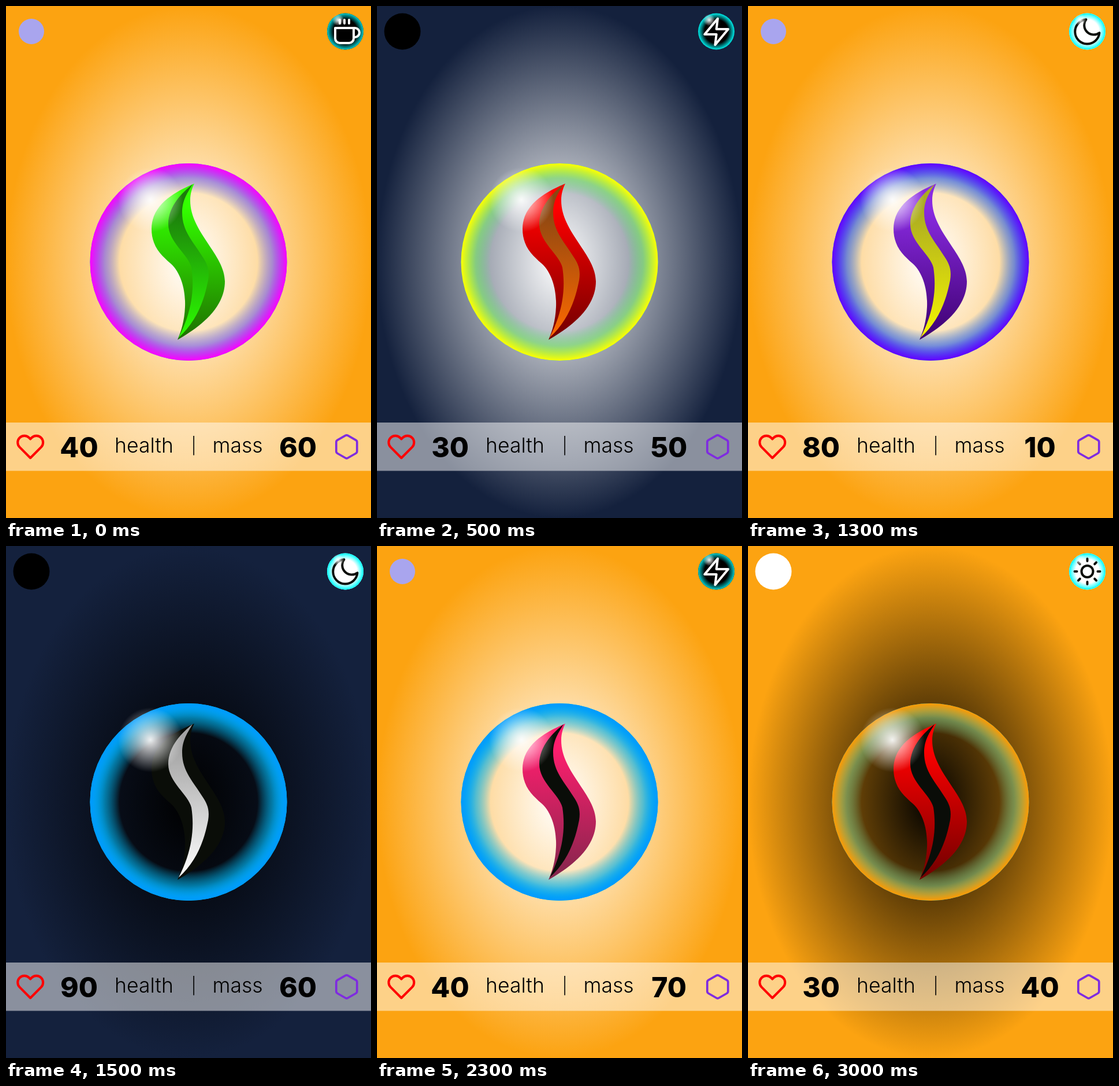
Recreate the animation shown at these times as an HTML page. Size 632x885 px, loop 3.5 s.

```html
<!DOCTYPE html>
<html lang="en">
<head>
<meta charset="utf-8">
<title>Orb cards</title>
<style>
  html, body { margin: 0; width: 100%; height: 100%; overflow: hidden; }
  svg { display: block; width: 632px; height: 885px; }
  text { font-family: Inter, sans-serif; text-anchor: middle; fill: #000; }
  .num { font-size: 48px; font-weight: 800; }
  .label { font-size: 35.5px; font-weight: 300; }
  .line { fill: none; stroke-linecap: round; stroke-linejoin: round; }
  .core { stop-color: var(--core); }
  .edge { stop-color: var(--edge); }
  .rim { stop-color: var(--rim); }
  .badge-rim { stop-color: var(--badgeRim); }
  .leaf-a { stop-color: var(--leafTop); }
  .leaf-b { stop-color: var(--leafEnd); }
  .vein-a { stop-color: var(--veinTop); }
  .vein-b { stop-color: var(--veinEnd); }
</style>
</head>
<body>
<svg id="card" viewBox="0 0 632 885">
  <defs>
    <radialGradient id="bg"><stop class="core"/><stop class="edge" offset="1"/></radialGradient>
    <radialGradient id="teal">
      <stop offset=".7" stop-color="#00c8dc" stop-opacity="0"/>
      <stop offset=".85" stop-color="#00c8dc" stop-opacity=".5"/>
      <stop offset="1" stop-color="#00c8dc"/>
    </radialGradient>
    <radialGradient id="rim">
      <stop class="rim" offset=".7" stop-opacity="0"/>
      <stop class="rim" offset=".85" stop-opacity=".33"/>
      <stop class="rim" offset="1"/>
    </radialGradient>
    <radialGradient id="badgeRim">
      <stop class="badge-rim" offset=".65" stop-opacity="0"/>
      <stop class="badge-rim" offset="1"/>
    </radialGradient>
    <radialGradient id="shine">
      <stop stop-color="#fff" stop-opacity=".93"/>
      <stop offset="1" stop-color="#fff" stop-opacity="0"/>
    </radialGradient>
    <linearGradient id="leaf" x2="0" y2="1">
      <stop class="leaf-a" offset=".15"/><stop class="leaf-b" offset="1"/>
    </linearGradient>
    <linearGradient id="vein" x2="0" y2="1">
      <stop class="vein-a" offset=".15"/><stop class="vein-b" offset="1"/>
    </linearGradient>
  </defs>

  <rect width="632" height="885" fill="url(#bg)"/>

  <circle cx="316" cy="442.5" r="170.5" fill="url(#teal)"/>
  <circle cx="316" cy="442.5" r="170.5" fill="url(#rim)"/>
  <path fill="url(#leaf)" d="M326 307C300 318 252 340 252 385C252 415 268 430 285 445
    C305 463 311 495 310 520C309 545 303 563 297 577C330 558 379 525 379 476
    C379 430 318 390 319 335C319 325 322 315 326 307Z"/>
  <path fill="url(#vein)" d="M323 308C306 322 281 345 281 377C281 408 316 430 321 452
    C327 490 321 530 299 573C330 545 343 510 350 474C353 455 348 445 340 433
    C325 408 305 390 305 357C305 335 315 322 323 308Z"/>
  <circle cx="250" cy="335" r="56" fill="url(#shine)"/>

  <circle id="token" cx="44" cy="44"/>

  <circle id="disc" cx="587.5" cy="44" r="31.5"/>
  <circle cx="587.5" cy="44" r="31.5" fill="url(#badgeRim)"/>
  <path id="icon" class="line"/>
  <circle cx="575.3" cy="24.3" r="10.4" fill="url(#shine)"/>

  <rect y="720" width="632" height="83.5" fill="#fff" fill-opacity=".5"/>
  <path class="line" stroke="#f00" stroke-width="1.95" transform="translate(17 736.6) scale(2.1)"
    d="M20.84 4.61a5.5 5.5 0 0 0-7.78 0L12 5.67l-1.06-1.06a5.5 5.5 0 0 0-7.78 7.78L12 21.23l8.84-8.84a5.5 5.5 0 0 0 0-7.78z"/>
  <text id="health" class="num" x="126.5" y="780"></text>
  <text class="label" x="239" y="772">health</text>
  <text class="label" style="font-size:28px" x="325" y="770">|</text>
  <text class="label" x="401" y="772">mass</text>
  <text id="mass" class="num" x="505.5" y="780"></text>
  <path class="line" stroke="#7f2be0" stroke-width="1.85" transform="translate(565.8 737.8) scale(2)"
    d="M21 16V8a2 2 0 0 0-1-1.73l-7-4a2 2 0 0 0-2 0l-7 4A2 2 0 0 0 3 8v8a2 2 0 0 0 1 1.73l7 4a2 2 0 0 0 2 0l7-4A2 2 0 0 0 21 16z"/>
</svg>
<script>
const STEP = 500;
const ORANGE = '#fca311', NAVY = '#14213d', INK = '#0a0d08';
const $ = id => document.getElementById(id);

// Icons live on a 24 unit grid: centre x, centre y, scale, path.
const icons = {
  coffee: [590, 46, 2, 'M18 8h1a4 4 0 0 1 0 8h-1M2 8h16v9a4 4 0 0 1-4 4H6a4 4 0 0 1-4-4V8zM6 1v3M10 1v3M14 1v3'],
  bolt: [587.7, 44.5, 2.27, 'M13 2L3 14h9l-1 8 10-12h-9z'],
  moon: [587.3, 44.5, 2.35, 'M21 12.79A9 9 0 1 1 11.21 3 7 7 0 0 0 21 12.79z'],
  sun: [587.5, 44, 2, 'M17 12a5 5 0 1 1-10 0a5 5 0 1 1 10 0M12 1v2M12 21v2M1 12h2M21 12h2' +
    'M4.22 4.22l1.42 1.42M18.36 18.36l1.42 1.42M4.22 19.78l1.42-1.42M18.36 5.64l1.42-1.42']
};

const tokens = {
  tint: ['#a9a5ee', 22],
  dark: ['#000', 31.5],
  light: ['#fff', 31.5]
};

// Leaf and vein colours run from top to bottom.
const skins = {
  green: ['#33ff00', '#1f6e00'],
  red: ['#ff0000', '#700000'],
  violet: ['#8a2be2', '#3d0070'],
  rose: ['#ff1e6e', '#82264c'],
  ink: [INK, INK],
  moss: ['#1c7a0c', '#2cff00'],
  amber: ['#8a4612', '#ff6a00'],
  lemon: ['#aaaa22', '#f6f600'],
  pearl: ['#a4a4a4', '#ffffff'],
  aqua: ['#239384', '#40e8d6']
};

// edge, core, rim, leaf, vein, token, icon, badge fill, badge rim, health, mass
const cards = [
  [ORANGE, '#fff', '#f0f', 'green', 'moss', 'tint', 'coffee', '#000', '#0cc', 40, 60],
  [NAVY, '#fff', '#ff0', 'red', 'amber', 'dark', 'bolt', '#000', '#0ee', 30, 50],
  [ORANGE, '#fff', '#60f', 'violet', 'lemon', 'tint', 'moon', '#fff', '#0ff', 80, 10],
  [NAVY, '#000', '#09f', 'ink', 'pearl', 'dark', 'moon', '#fff', '#0ff', 90, 60],
  [ORANGE, '#fff', '#09f', 'rose', 'ink', 'tint', 'bolt', '#000', '#0cc', 40, 70],
  [NAVY, '#000', '#f0f', 'red', 'aqua', 'tint', 'coffee', '#fff', '#0ff', 10, 50],
  [ORANGE, '#000', '#f90', 'red', 'ink', 'light', 'sun', '#fff', '#0ff', 30, 40]
];

function set(el, attrs) {
  for (const key in attrs) el.setAttribute(key, attrs[key]);
}

function show([edge, core, rim, leaf, vein, token, icon, fill, badgeRim, health, mass]) {
  const [leafTop, leafEnd] = skins[leaf];
  const [veinTop, veinEnd] = skins[vein];
  const vars = { edge, core, rim, badgeRim, leafTop, leafEnd, veinTop, veinEnd };
  for (const key in vars) $('card').style.setProperty('--' + key, vars[key]);

  const [color, r] = tokens[token];
  set($('token'), { fill: color, r });

  const [x, y, scale, d] = icons[icon];
  set($('disc'), { fill });
  set($('icon'), {
    d,
    stroke: fill === '#000' ? '#fff' : INK,
    'stroke-width': 4 / scale,
    transform: `translate(${x} ${y}) scale(${scale}) translate(-12 -12)`
  });

  $('health').textContent = health;
  $('mass').textContent = mass;
}

const start = performance.now();
let current = -1;

function tick() {
  const i = Math.floor((performance.now() - start) / STEP) % cards.length;
  if (i !== current) show(cards[current = i]);
  requestAnimationFrame(tick);
}
tick();
</script>
</body>
</html>
```
